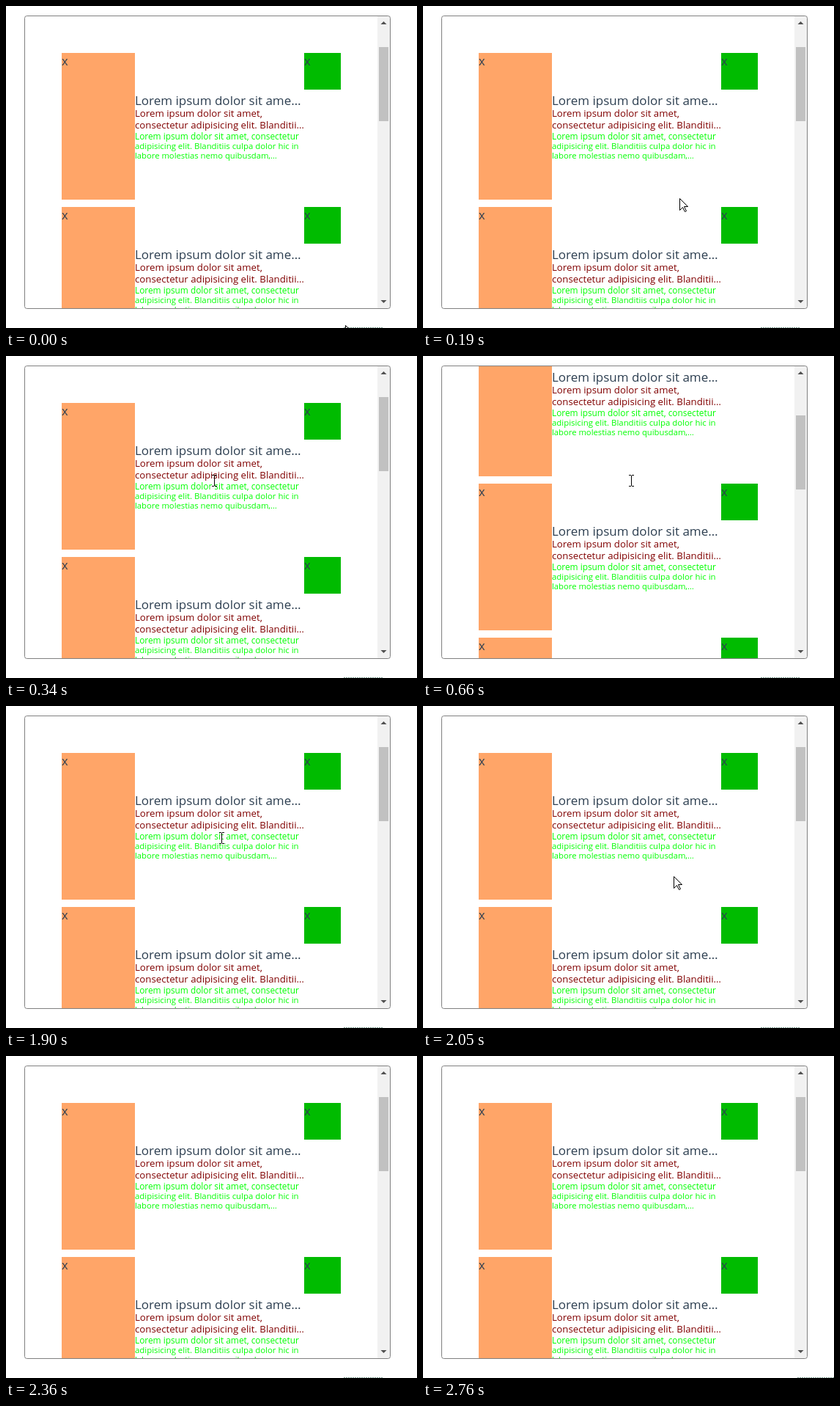
Write an HTML page that moves like this. It is 561 px wide and 439 px high and loops after 2.91 s.

```html
<!DOCTYPE html>
<html lang="en">
<head>
<meta charset="utf-8">
<style>
html, body { margin: 0; width: 100%; height: 100%; overflow: hidden; background: #fff; }
svg { display: block; font-family: "Open Sans", "Noto Sans", sans-serif; }
</style>
</head>
<body>
<svg width="561" height="439" viewBox="0 0 561 439">
  <defs>
    <clipPath id="view"><rect x="26" y="14" width="481" height="398"/></clipPath>
    <g id="item">
      <rect x="76" y="64" width="100" height="200" fill="#ffa568"/>
      <rect x="407" y="64" width="50" height="50" fill="#0b0"/>
      <g fill="#2c3e50">
        <text x="76" y="81" font-size="16.5">x</text>
        <text x="407" y="81" font-size="16.5">x</text>
        <text x="176" y="135" font-size="17">Lorem ipsum dolor sit ame…</text>
      </g>
      <g fill="#800000" font-size="13.24">
        <text x="176" y="151">Lorem ipsum dolor sit amet,</text>
        <text x="176" y="167">consectetur adipisicing elit. Blanditii…</text>
      </g>
      <g fill="#0f0">
        <text x="176" y="182" font-size="11.85">Lorem ipsum dolor sit amet, consectetur</text>
        <text x="176" y="195" font-size="11.4">adipisicing elit. Blanditiis culpa dolor hic in</text>
        <text x="176" y="208" font-size="11.25">labore molestias nemo quibusdam,…</text>
      </g>
    </g>
  </defs>
  <g clip-path="url(#view)">
    <g id="list">
      <use href="#item"/>
      <use href="#item" y="210"/>
      <use href="#item" y="420"/>
    </g>
  </g>
  <rect x="507" y="14" width="17" height="398" fill="#f1f1f1"/>
  <rect id="thumb" x="509" y="56" width="13" height="101" fill="#c1c1c1"/>
  <path d="M511.5 25h8l-4-4zM511.5 401h8l-4 4z" fill="#505050"/>
  <rect x="25.5" y="13.5" width="499" height="399" rx="3" fill="none" stroke="#808080"/>
  <path id="dots" stroke="#7d9c91" stroke-dasharray="2 1"/>
  <path id="arrow" d="M.5 .5v16l4-4 3 6 2-1-3-6h5z" fill="#fff" stroke="#000"/>
  <path id="beam" d="M-3 -7.5h3M1 -7.5h3M.5 -7V7M-3 7.5h3M1 7.5h3" fill="none" stroke="#000"/>
</svg>
<script>
const $ = id => document.getElementById(id);
const LOOP = 2910;

// Pointer stops: start time, x, y
const stops = [
  [0, 463, 435],
  [70, 412, 352], [140, 350, 262], [210, 310, 205], [270, 291, 179], [340, 284, 170],
  [1900, 294, 180], [1980, 342, 232], [2060, 428, 322], [2130, 506, 400], [2210, 507, 431],
  [2360, 507, 500]
];

const overText = (x, y) =>
  x > 176 && x < 407 && ((y > 119 && y < 211) || (y > 329 && y < 412));

function draw(t) {
  const scrolled = t >= 660 && t < 1120;
  $("list").setAttribute("transform", `translate(0 ${scrolled ? -100 : 0})`);
  $("thumb").setAttribute("y", scrolled ? 81 : 56);
  $("dots").setAttribute("d", t < 2760 ? "M461 438.5H514" : "M511 438.5H561");

  const [, x, y] = stops.findLast(s => s[0] <= t);
  const text = overText(x, y);
  for (const id of ["arrow", "beam"]) {
    $(id).setAttribute("transform", `translate(${x} ${y})`);
    $(id).style.display = text === (id === "beam") ? "" : "none";
  }
}

function tick() {
  draw(performance.now() % LOOP);
  requestAnimationFrame(tick);
}
tick();
</script>
</body>
</html>
```
